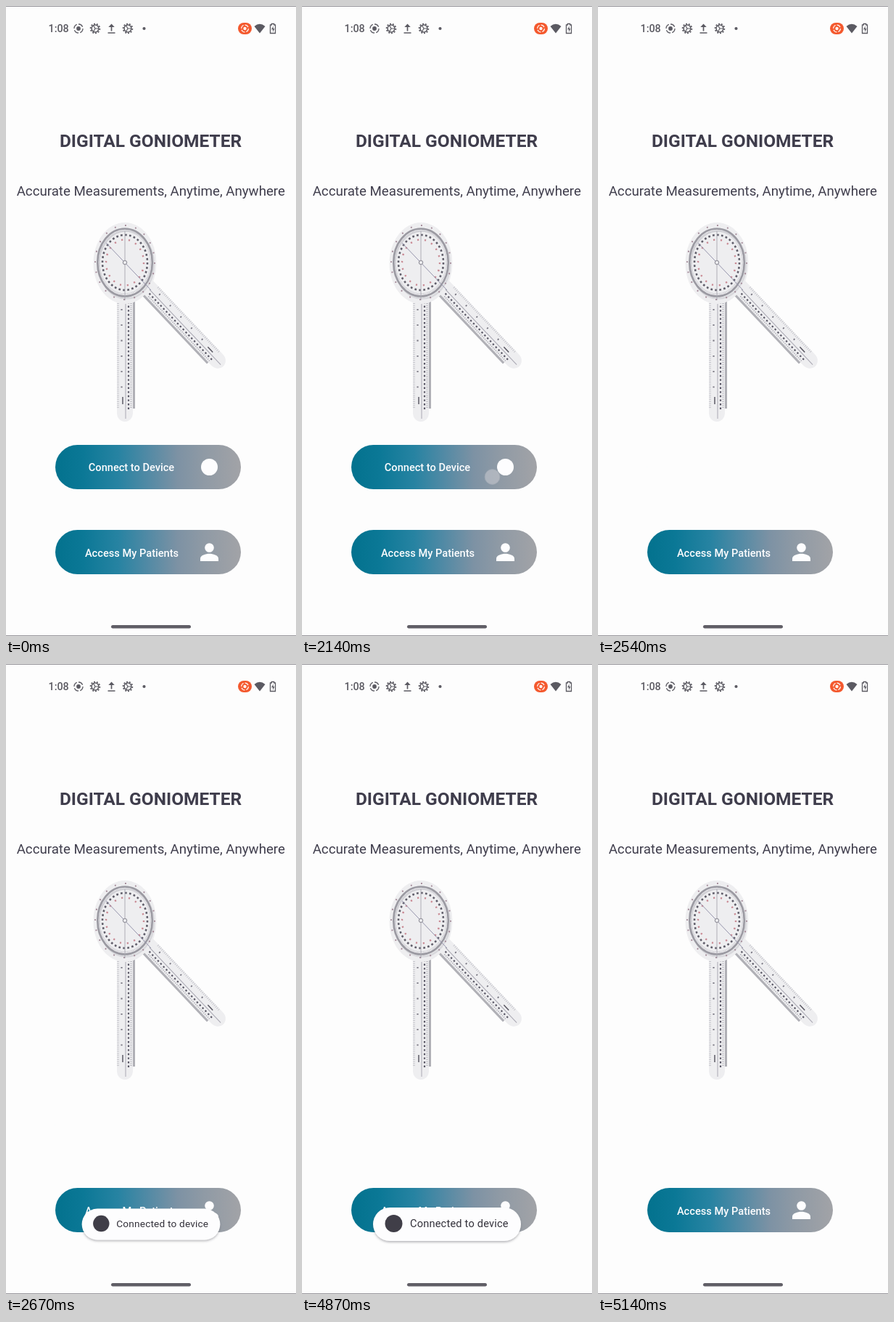
Recreate the animation shown at these times as an HTML page. Size 400 px wide and 867 px high, loop 5.86 s.

```html
<!DOCTYPE html>
<html lang="en">
<head>
<meta charset="utf-8">
<title>Digital Goniometer</title>
<style>
  html, body { margin: 0; height: 100%; overflow: hidden; background: #fdfdfd; }
  svg { display: block; width: 100vw; height: 100vh; font-family: Roboto, sans-serif; }
  .mid { text-anchor: middle; fill: #3f3d4c; }
  .label { font-size: 14.6px; font-weight: 500; fill: #fdfdfe; text-anchor: middle; }
  .icon { fill: none; stroke: #5b5a62; }
  .solid { fill: #5b5a62; }
</style>
</head>
<body>
<svg viewBox="0 0 400 867">
  <defs>
    <linearGradient id="pill">
      <stop offset="0" stop-color="#03728e"/>
      <stop offset=".15" stop-color="#0b7896"/>
      <stop offset=".34" stop-color="#2783a2"/>
      <stop offset=".5" stop-color="#528aa5"/>
      <stop offset=".66" stop-color="#7d92a4"/>
      <stop offset=".8" stop-color="#8f9aa5"/>
      <stop offset="1" stop-color="#a2a3a7"/>
    </linearGradient>
    <filter id="soft" x="-20%" y="-30%" width="140%" height="170%">
      <feDropShadow dx="0" dy="2" stdDeviation="1.8" flood-color="#50505a" flood-opacity=".38"/>
    </filter>
    <rect id="button" x="68" width="256" height="61" rx="30.5" fill="url(#pill)"/>
    <g id="gear" class="icon">
      <circle r="4.9" stroke-width="1.5"/>
      <circle r="6.4" stroke-width="1.7" pathLength="20" stroke-dasharray="1"/>
      <path d="M0 0L4.6 0M0 0L-2.4 -4.1M0 0L-2.4 4.1" stroke-width="1.2"/>
    </g>
  </defs>

  <rect width="400" height="867" fill="#fdfdfd"/>
  <path d="M0 .5H400M0 866.5H400" stroke="#98969c"/>

  <!-- status bar -->
  <text x="58.500" y="36" font-size="14.300" font-weight="500" class="solid">1:08</text>
  <g class="icon">
    <g transform="translate(100 31)">
      <circle r="2.900" class="solid" stroke="none"/>
      <circle r="6" stroke-width="1.300" pathLength="16" stroke-dasharray="3 1"/>
    </g>
    <use href="#gear" x="123" y="31"/>
    <use href="#gear" x="168" y="31"/>
    <path d="M140.500 37H150.500M145.500 34.500V27" stroke-width="1.700"/>
    <path d="M141.300 29L145.500 24.500L149.700 29Z" class="solid" stroke="none"/>
    <circle cx="190.500" cy="31" r="2.100" class="solid" stroke="none"/>
    <rect x="320" y="23" width="19" height="16" rx="8" fill="#f4592e" stroke="none"/>
    <g transform="translate(329.500 31)" stroke="#fff1ec">
      <circle r="2.200" fill="#fff1ec" stroke="none"/>
      <circle r="4.900" stroke-width="1.200" pathLength="16" stroke-dasharray="3 1"/>
    </g>
    <path d="M342.500 28Q350 21.500 357.500 28L350 37.500Z" class="solid" stroke="none"/>
    <path d="M366.300 24.500H369.700V26H371.500V37.500H364.500V26H366.300Z" stroke-width="1.300"/>
    <path d="M368.800 27.500L366 32.200H368V36L370.400 31H368.500Z" class="solid" stroke="none"/>
  </g>

  <text x="199.500" y="193.600" class="mid" font-size="24.500" font-weight="700">DIGITAL GONIOMETER</text>
  <text x="199.800" y="260.500" class="mid" font-size="18.700">Accurate Measurements, Anytime, Anywhere</text>

  <!-- goniometer -->
  <g transform="translate(164 353)" fill="none">
    <g id="arms"></g>
    <ellipse cy="1" rx="43.500" ry="56" fill="#eeeef0"/>
    <ellipse cx="2" cy="3" rx="38" ry="46.500" stroke="#d9d9dd" stroke-width="2.500"/>
    <ellipse rx="37.800" ry="46.500" stroke="#9b9aa2" stroke-width="2.600"/>
    <g id="dial"></g>
    <path d="M0 -43V52" stroke="#a5a4ae" stroke-width=".9"/>
    <path d="M-26 -27L36 38" stroke="#9594ac"/>
    <circle r="2.600" fill="#f1f1f4" stroke="#96959e" stroke-width="1.200"/>
  </g>

  <g id="connect">
    <use href="#button" y="604"/>
    <text x="173" y="640" class="label">Connect to Device</text>
    <circle cx="280.500" cy="634.500" r="11.500" fill="#fdfdfe"/>
  </g>
  <use href="#button" y="721"/>
  <text x="173.500" y="757.500" class="label">Access My Patients</text>
  <g fill="#fdfdfe">
    <circle cx="280.500" cy="745.500" r="6.300"/>
    <path d="M268 764V760.500C268 756 275.500 753.800 280.500 753.800S293 756 293 760.500V764Z"/>
  </g>
  <circle id="touch" cx="262.500" cy="648" r="10.400" fill="#d2d2d6" fill-opacity=".93" stroke="#b4b8c0" stroke-width=".8"/>

  <g id="toast">
    <rect x="98" y="748" width="204" height="46" rx="23" fill="#fdfdfe" filter="url(#soft)"/>
    <circle cx="126.500" cy="770" r="12" fill="#403e48"/>
    <text x="149" y="775.500" font-size="14.600" letter-spacing=".2" fill="#33313a">Connected to device</text>
  </g>

  <rect x="145" y="852" width="110" height="4.500" rx="2.250" fill="#605e66"/>
</svg>
<script>
const LOOP = 5860;
const $ = id => document.getElementById(id);
const ramp = (t, from, span) => Math.max(0, Math.min(1, (t - from) / span));
const smooth = v => v * v * (3 - 2 * v);

// A ruler hanging down from the pivot; side is 1 or -1 for the shaded edge.
function arm(end, angle, side) {
  const tip = end - 12;
  return `<g transform="rotate(${angle}) scale(${side} 1)">
    <path d="M12 50V${tip - 6}" stroke="#b0b0b6" stroke-width="4"/>
    <path d="M-11 40V${tip}A11 12 0 0 0 11 ${tip}V40Z" fill="#eeeef0"/>
    <path d="M1 50V${end - 4}" stroke="#a9a8b2"/>
    <path d="M-9.500 56V${tip - 6}" stroke="#c6c6cc" stroke-width="3" stroke-dasharray="1 1.700"/>
    <path d="M8.500 56V${tip - 6}" stroke="#a9a8b0" stroke-width="2" stroke-dasharray="1 1.700"/>
    <path d="M5 54V${tip - 4}" stroke="#5a5866" stroke-width="2.200" stroke-dasharray="2.400 3.200"/>
    <path d="M-4.500 64V${tip - 20}" stroke="#777580" stroke-width="2.200" stroke-dasharray="1.800 19.500"/>
    <path d="M-3 ${tip - 22}V${tip - 12}" stroke="#514f5a" stroke-width="1.400"/>
  </g>`;
}

// Evenly spaced marks around an ellipse.
const marks = (rx, ry, count, fill, color, width) =>
  `<ellipse rx="${rx}" ry="${ry}" pathLength="${count}" stroke="${color}"
    stroke-width="${width}" stroke-dasharray="${fill} ${1 - fill}"/>`;

$("arms").innerHTML = arm(197, -43.5, -1) + arm(219, 0, 1);
$("dial").innerHTML =
  marks(41, 51, 20, .13, "#a48a98", 2) +
  marks(35.2, 43.3, 120, .4, "#c2c1c8", 2) +
  marks(31, 38, 36, .45, "#605e6a", 2.6) +
  marks(26, 31.5, 18, .22, "#c98a94", 2.4);

function draw(now) {
  const t = now % LOOP;
  $("connect").style.display = t < 2540 ? "" : "none";
  $("touch").setAttribute("opacity", t < 2000 ? 0 : 1 - ramp(t, 2050, 200));

  // The toast pops in quickly while growing, then shrinks before it fades.
  const alpha = ramp(t, 2545, 83) * (1 - ramp(t, 5030, 100));
  const size = .9 + .1 * (smooth(ramp(t, 2540, 330)) - ramp(t, 4870, 260) ** 1.5);
  $("toast").setAttribute("opacity", alpha);
  $("toast").setAttribute("transform",
    `translate(200 771) scale(${size}) translate(-200 -771)`);
}

const start = performance.now();
function tick() {
  draw(performance.now() - start);
  requestAnimationFrame(tick);
}
tick();
</script>
</body>
</html>
```
